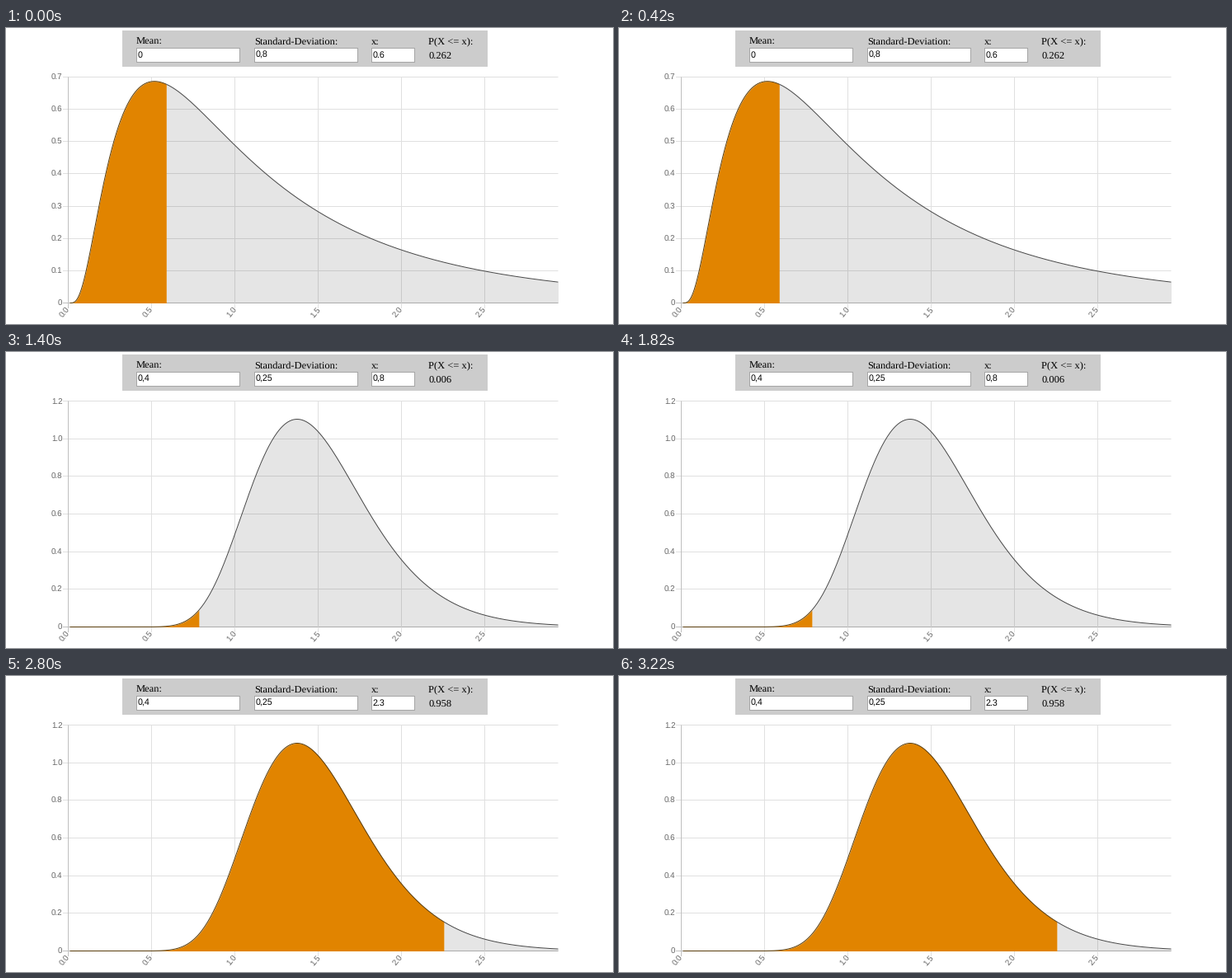
Animation of 736x359 px, one loop 3.5 s. Source, as a matplotlib script:

```python
import math

import matplotlib.pyplot as plt
import numpy as np
from matplotlib.animation import FuncAnimation
from matplotlib.patches import Rectangle

W, H, DPI = 736, 359, 64
LEFT, RIGHT, TOP, BOTTOM = 75.5, 669.5, 59.5, 333.5
X_MAX = 3.0
TICK_GAP = 100.95

PANEL, BORDER = "#cccccc", "#a6a6a6"
GRID, AXIS, LABEL = "#e0e0e0", "#bfbfbf", "#666666"
ORANGE, BROWN, INK = "#e18400", "#5a3d0c", "#484848"

# mean, standard deviation, x (as typed), axis top, axis step
STATES = [
    ("0", "0,8", "0.6", 0.7, 0.1),
    ("0,0", "0,25", "0,8", 1.8, 0.2),
    ("0,4", "0,25", "0,8", 1.2, 0.2),
    ("0,4", "0,25", "1.3", 1.2, 0.2),
    ("0,4", "0,25", "2.3", 1.2, 0.2),
]

plt.rcParams["text.hinting"] = "none"
fig = plt.figure(figsize=(W / DPI, H / DPI), dpi=DPI, facecolor="white")
ax = fig.add_axes([0, 0, 1, 1])


def px(size):
    return size * 72 / DPI


def crisp(v):
    return math.floor(v) + 0.5


def number(text):
    return float(text.replace(",", "."))


def density(x, mean, sd):
    z = (np.log(x) - mean) / sd
    return np.exp(-z * z / 2) / (x * sd * math.sqrt(2 * math.pi))


def probability(x, mean, sd):
    return 0.5 * (1 + math.erf((math.log(x) - mean) / (sd * math.sqrt(2))))


def write(x, y, text, size, font, color="black", **kw):
    ax.text(x, y, text, fontsize=px(size), family=font, color=color, **kw)


def line(xs, ys, color, zorder):
    ax.plot(xs, ys, color=color, lw=px(1), solid_capstyle="butt",
            snap=False, zorder=zorder)


def area(xs, ys, zorder, **kw):
    ax.fill_between(xs, ys, BOTTOM, lw=0, zorder=zorder, **kw)


def box(x0, y0, x1, y1, color):
    ax.add_patch(Rectangle((x0, y0), x1 - x0, y1 - y0, fc=color, lw=0))


def field(x0, x1, caption, value):
    write(x0, 19.5, caption, 12.45, "Liberation Serif")
    box(x0, 24, x1, 42, BORDER)
    box(x0 + 1, 25, x1 - 1, 41, "white")
    write(x0 + 1.7, 36, value, 10.6, "Liberation Sans")


def draw_panel(mean, sd, x, p):
    box(141, 3, 584, 47, PANEL)
    field(158, 284, "Mean:", mean)
    field(301, 427, "Standard-Deviation:", sd)
    field(443, 496, "x:", x)
    write(512.5, 19.5, "P(X <= x):", 12.45, "Liberation Serif")
    write(512.5, 37.5, f"{p:.3f}", 12.45, "Liberation Serif")


def draw_grid(top, step):
    count = round(top / step)
    for i in range(count + 1):
        y = crisp(BOTTOM - (BOTTOM - TOP) * i / count)
        line([69, RIGHT], [y, y], GRID if i else AXIS, 1)
        write(68.3, y + 3.3, f"{i * step:.1f}" if i else "0", 9.7,
              "Liberation Sans", LABEL, ha="right")
    for i in range(6):
        x = crisp(LEFT + TICK_GAP * i)
        line([x, x], [TOP, 340], GRID if i else AXIS, 1)
        write(x - 3.2, 345.3, f"{i / 2:.1f}", 9.7, "Liberation Sans", LABEL,
              ha="center", va="center", rotation=50)


def draw_curve(mean, sd, x, top):
    split = np.linspace(0.01, x, 400), np.linspace(x, X_MAX, 400)
    (xa, ya), (xb, yb) = [
        (LEFT + (RIGHT - LEFT) * v / X_MAX,
         BOTTOM - (BOTTOM - TOP) * density(v, mean, sd) / top)
        for v in split
    ]
    area(xb, yb, 2, color="black", alpha=0.1)
    area(xa, ya, 2, color=ORANGE)
    line(xa, ya, BROWN, 3)
    line(xb, yb, INK, 3)


def draw(i):
    mean, sd, x, top, step = STATES[i]
    m, s, v = number(mean), number(sd), number(x)
    ax.clear()
    ax.set_xlim(0, W)
    ax.set_ylim(H, 0)
    ax.axis("off")
    draw_panel(mean, sd, x, probability(v, m, s))
    draw_grid(top, step)
    draw_curve(m, s, v, top)
    return []


anim = FuncAnimation(fig, draw, frames=len(STATES), interval=700,
                     init_func=lambda: draw(0), repeat=True, repeat_delay=0)
plt.show()
```
